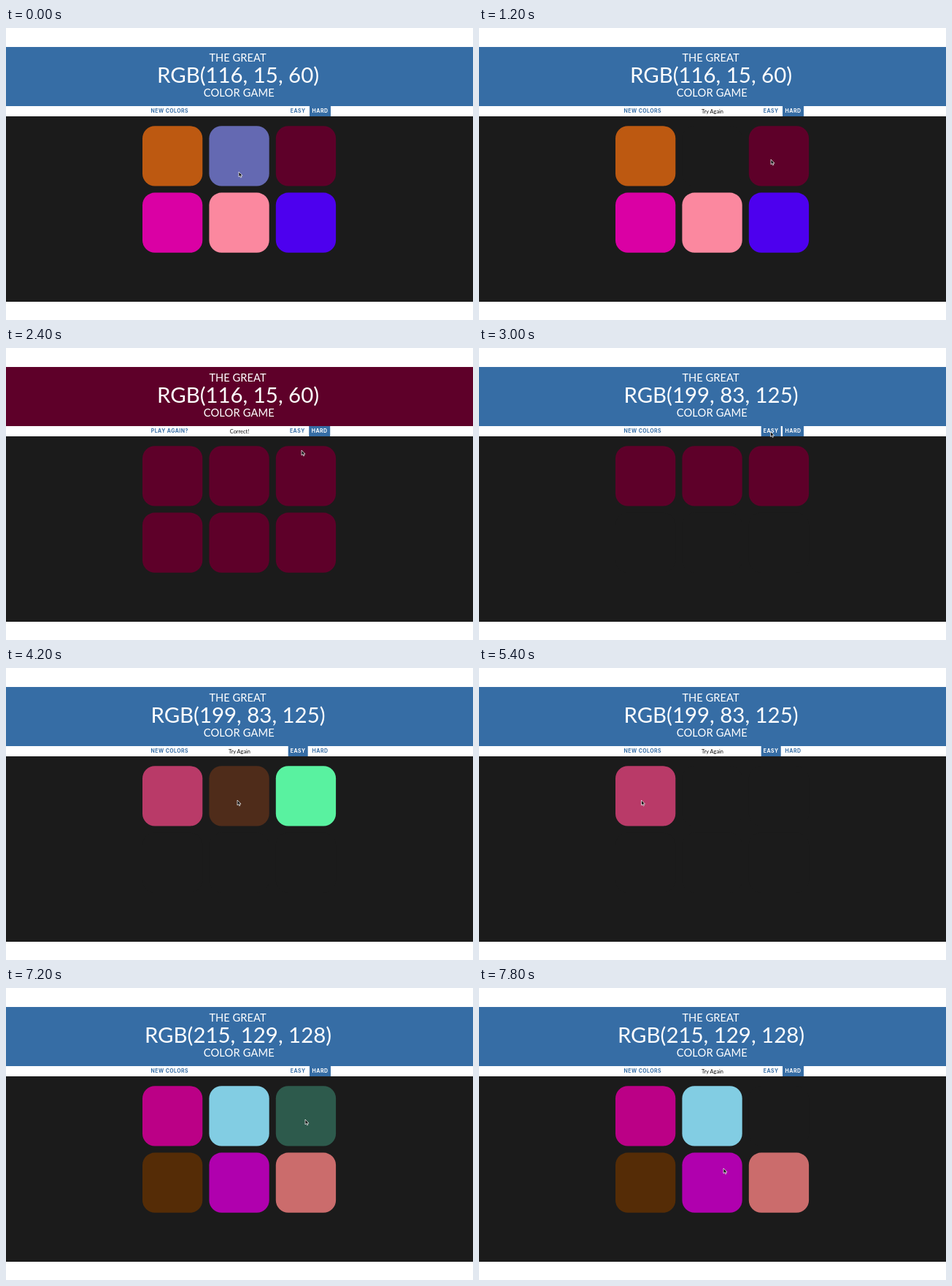
These frames come from a looping animation (640 px wide and 400 px high, 8000 ms). An HTML page:

```html
<!DOCTYPE html>
<html lang="en">
<head>
<meta charset="utf-8">
<title>Color Game</title>
<style>
  html, body { margin: 0; width: 100%; height: 100%; overflow: hidden; background: #fff; }
  svg { display: block; width: 640px; height: 400px; }
  text { text-anchor: middle; }
  .title { font-family: Lato, sans-serif; fill: #fff; font-size: 14.7px; }
  .big { font-size: 29.4px; }
  .nav { font: 700 6.9px Inter, sans-serif; letter-spacing: .5px; fill: #366da5; }
  .msg { font: 7.4px Lato, sans-serif; fill: #111; }
  .on { fill: #fff; }
</style>
</head>
<body>
<svg viewBox="0 0 640 400">
  <rect id="header" y="26" width="640" height="81"/>
  <rect y="121" width="640" height="254" fill="#1b1b1b"/>
  <text class="title" x="317.5" y="46">THE GREAT</text>
  <text class="title big" id="goal" x="318" y="75.3"></text>
  <text class="title" x="319.3" y="94.3" letter-spacing=".15">COLOR GAME</text>
  <text class="nav" id="reset" x="224.3" y="116.4"></text>
  <text class="msg" id="msg" x="320" y="116.5"></text>
  <g id="modes">
    <rect id="easyBox" x="386.7" y="107" width="27" height="14" fill="#366da5"/>
    <rect id="hardBox" x="416" y="107" width="29" height="14" fill="#366da5"/>
    <text class="nav" id="easy" x="400.1" y="116.4">EASY</text>
    <text class="nav" id="hard" x="430.5" y="116.4">HARD</text>
  </g>
  <g id="tiles"></g>
  <path id="cursor" d="M0 0V7L1.6 5.6L2.7 8L3.9 7.4L2.8 5.2H5Z" fill="#111" stroke="#fff" stroke-width=".7"/>
</svg>
<script>
const STEP = 600, LOOP = 8000;
const BLUE = '#366da5', WINE = '#5e0029', PINK = '#b93a68', GONE = '#1b1b1b';
const $ = id => document.getElementById(id);

// Blend of two hex colours
const mix = (a, b, k = .5) => '#' + [1, 3, 5].map(i => {
  const p = parseInt(a.substr(i, 2), 16), q = parseInt(b.substr(i, 2), 16);
  return Math.round(p + (q - p) * k).toString(16).padStart(2, '0');
}).join('');
const without = (list, i, colour = GONE) => list.map((c, n) => n === i ? colour : c);

const first = ['#bd5911', '#6469b2', WINE, '#da00a4', '#fb889f', '#4d00ee'];
const second = [PINK, '#6a3419', '#59f2a0'];
const third = ['#bb0086', '#82cde3', '#2d5a4c', '#552c06', '#b000ae', '#cb6c6c'];
const firstLeft = without(first, 1);
const secondLeft = without(second, 1);

const hard1 = { goal: '116, 15, 60', mode: 'hard' };
const won1 = { ...hard1, header: WINE, msg: 'Correct!' };
const easy = { goal: '199, 83, 125', mode: 'easy' };
const wonEasy = { ...easy, header: PINK, msg: 'Correct!' };
const hard2 = { goal: '215, 129, 128', mode: 'hard' };
const miss = { msg: 'Try Again' };

const scenes = [
  { ...hard1, tiles: first, at: [319, 197] },
  { ...hard1, ...miss, tiles: without(first, 1, mix(first[1], GONE)), at: [319, 197] },
  { ...hard1, ...miss, tiles: firstLeft, at: [400, 180] },
  { ...won1, tiles: firstLeft.map(c => mix(c, WINE)), at: [406, 179] },
  { ...won1, tiles: Array(6).fill(WINE), at: [405, 140] },
  { ...easy, mode: 'both', tiles: Array(3).fill(WINE), at: [399.5, 114.5] },
  { ...easy, tiles: second, at: [330, 170] },
  { ...easy, ...miss, tiles: without(second, 1, '#4f2c1a'), at: [317, 181] },
  { ...easy, ...miss, tiles: without(secondLeft, 2, mix(second[2], GONE)), at: [405, 181] },
  { ...easy, ...miss, tiles: without(secondLeft, 2), at: [222.5, 181] },
  { ...wonEasy, tiles: [PINK, mix(GONE, PINK), mix(GONE, PINK)], at: [222.5, 181] },
  { ...wonEasy, mode: 'both', tiles: Array(3).fill(PINK), at: [431, 115] },
  { ...hard2, tiles: third, at: [410, 180] },
  { ...hard2, ...miss, tiles: without(third, 2), at: [335, 247] }
];

const tiles = first.map((_, i) => {
  const r = document.createElementNS('http://www.w3.org/2000/svg', 'rect');
  const box = { x: 187 + i % 3 * 91.4, y: 134.3 + (i > 2) * 91.3, width: 82.3, height: 82.2, rx: 17 };
  for (const k in box) r.setAttribute(k, box[k]);
  return $('tiles').appendChild(r);
});

function show({ goal, mode, header = BLUE, msg = '', tiles: colours, at }) {
  const won = header !== BLUE;
  $('header').style.fill = header;
  $('goal').textContent = `RGB(${goal})`;
  $('reset').textContent = won ? 'PLAY AGAIN?' : 'NEW COLORS';
  $('msg').textContent = msg;
  $('modes').setAttribute('transform', `translate(${won ? -.8 : 0})`);
  for (const name of ['easy', 'hard']) {
    const on = mode === name || mode === 'both';
    $(name).classList.toggle('on', on);
    $(name + 'Box').style.display = on ? '' : 'none';
  }
  tiles.forEach((tile, i) => tile.style.fill = colours[i] || GONE);
  $('cursor').setAttribute('transform', `translate(${at})`);
}

let current = -1;
function frame() {
  const n = Math.floor(performance.now() % LOOP / STEP);
  if (n !== current) show(scenes[current = n]);
  requestAnimationFrame(frame);
}
frame();
</script>
</body>
</html>
```
